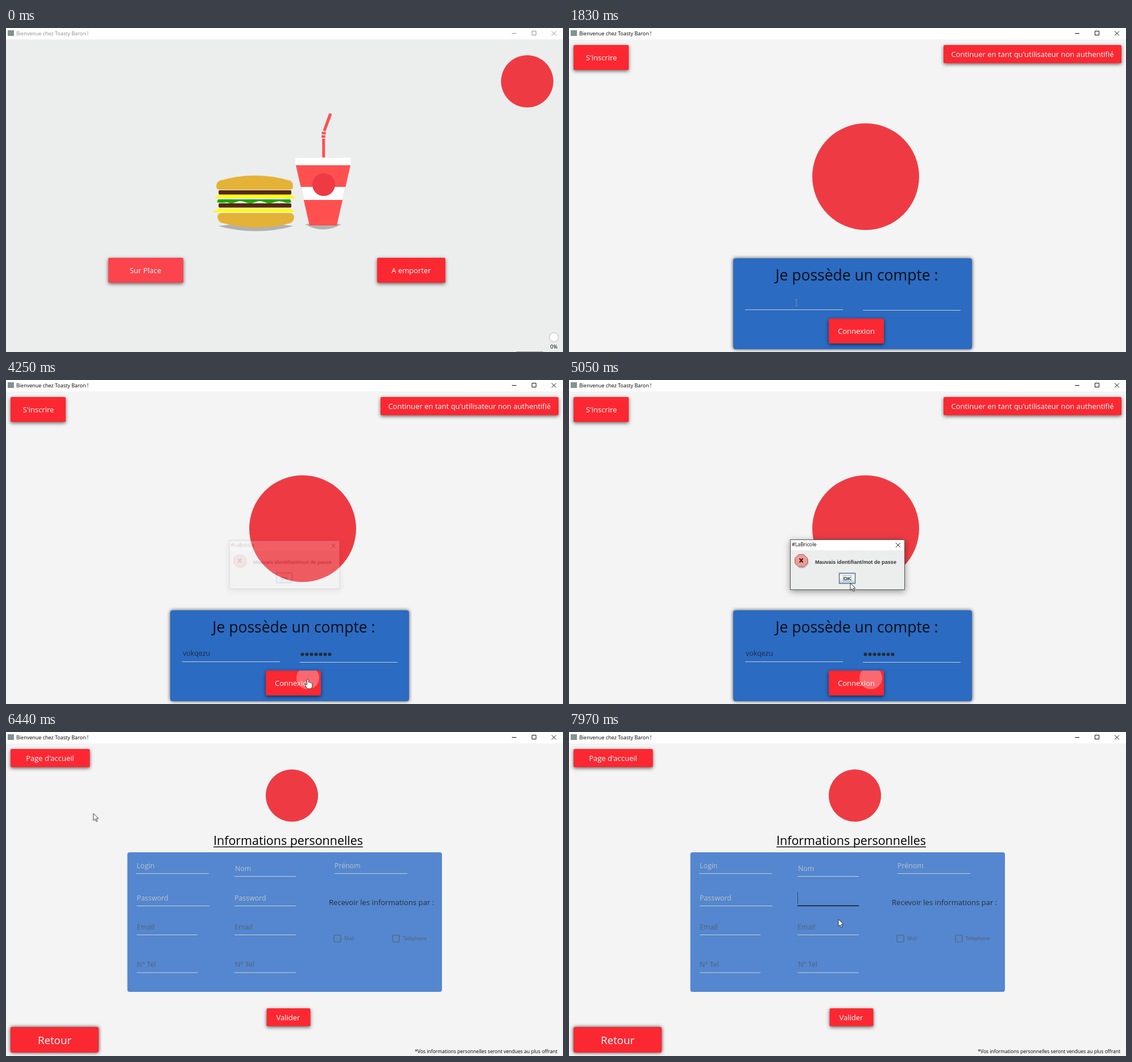
These frames come from a looping animation (980 by 571 pixels, 8 s). An HTML page:

```html
<!DOCTYPE html>
<html lang="fr">
<head>
<meta charset="utf-8">
<title>Borne de commande</title>
<style>
html, body { margin: 0; width: 100%; height: 100%; overflow: hidden; background: #f4f4f4; }
svg { display: block; width: 980px; height: 571px; font: 13px "Open Sans", "Noto Sans", sans-serif; }
text { white-space: pre; }
.mid text { text-anchor: middle; fill: #fff; }
.btn { fill: #fb2832; filter: drop-shadow(0 2px 3px rgba(0,0,0,.6)); }
.small { font-size: 8.8px; }
.logo { fill: #ee3b43; }
.line { stroke: #c9cdd3; }
.focus { fill: #14181f; transform-box: fill-box; transform-origin: center; }
.prompt { font-size: 12.4px; fill: #bcc2cb; }
.dim { fill: #55606f; }

/* one shared 8 s clock: percentage = ms / 80 */
.a { animation: 8s linear infinite; }
.s { animation: 8s step-end infinite; }

.scene1 { animation-name: scene1; }
.scene3 { animation-name: scene3; }
@keyframes scene1 { 0% { opacity: 1 } 16.25%, 100% { opacity: 0 } }
@keyframes scene3 { 0% { opacity: 0 } 76.875%, 100% { opacity: 1 } }

.bar { animation-name: bar; }
.hint { animation-name: hint; }
.warm { animation-name: warm; }
@keyframes bar { 0% { opacity: .45 } 2.875%, 100% { opacity: 1 } }
@keyframes hint { 0% { opacity: 1 } 2.875%, 100% { opacity: 0 } }
@keyframes warm { 0% { opacity: .13 } .25%, 100% { opacity: 0 } }

.rip1 { animation-name: rip1; }
.rip2 { animation-name: rip2; }
.rip3 { animation-name: rip3; }
@keyframes rip1 {
  0%, 13.5% { transform: scale(0); opacity: .3 }
  16.25%, 100% { transform: scale(1.69); opacity: .3 }
}
@keyframes rip2 {
  0%, 52.125% { transform: scale(0); opacity: .3 }
  53.125%, 65% { transform: scale(1); opacity: .3 }
  66.875%, 100% { transform: scale(1); opacity: 0 }
}
@keyframes rip3 {
  0%, 74.5% { transform: scale(0); opacity: .3 }
  76.875%, 100% { transform: scale(1.5); opacity: .3 }
}

.focus1 { animation-name: focus1; }
.focus2 { animation-name: focus2; }
.focus3 { animation-name: focus3; }
@keyframes focus1 {
  0%, 23.375% { transform: scaleX(0) }
  25.625%, 37.62% { transform: scaleX(1) }
  37.625%, 100% { transform: scaleX(0) }
}
@keyframes focus2 {
  0%, 37.625% { transform: scaleX(0) }
  40.625%, 52.12% { transform: scaleX(1) }
  52.125%, 100% { transform: scaleX(0) }
}
@keyframes focus3 {
  0%, 96.375% { transform: scaleX(0) }
  98.75%, 100% { transform: scaleX(1) }
}
.caret { animation-name: caret; }
.gone { animation-name: gone; }
@keyframes caret { 0% { opacity: 0 } 96.375%, 100% { opacity: 1 } }
@keyframes gone { 0% { opacity: 1 } 96.375%, 100% { opacity: 0 } }

/* typed characters appear at --t and outlast their scene */
.key > * { opacity: 0; animation: key 8s step-end calc(var(--t) * 1ms) infinite; }
@keyframes key { 0% { opacity: 1 } 60%, 100% { opacity: 0 } }

.dialog { animation-name: dialog; transform-origin: 490px 325px; }
@keyframes dialog {
  0%, 52.75% { opacity: 0; transform: scale(.955) }
  53.125% { opacity: .18; transform: scale(.965) }
  55%, 64.5% { opacity: 1; transform: none }
  66.25%, 100% { opacity: 0; transform: scale(.95) }
}

.cursor { animation-name: move; }
@keyframes move {
  0% { transform: translate(920px, 600px) }
  3.25% { transform: translate(920px, 571px); animation-timing-function: ease-in-out }
  12.5%, 16.625% { transform: translate(264px, 430px); animation-timing-function: ease-in-out }
  22.875%, 35% { transform: translate(400px, 484px); animation-timing-function: ease-in-out }
  37.25%, 46.25% { transform: translate(531px, 483px); animation-timing-function: ease-in }
  47.375% { transform: translate(531px, 515px); animation-timing-function: ease-out }
  49%, 55% { transform: translate(531px, 527px); animation-timing-function: ease-in-out }
  61.25%, 65% { transform: translate(495px, 358px); animation-timing-function: ease-in }
  71.625% { transform: translate(192px, 148px); animation-timing-function: ease-out }
  74.125%, 77.5% { transform: translate(75px, 52px); animation-timing-function: ease-in }
  80.5% { transform: translate(153px, 143px) }
  82.25% { transform: translate(253px, 199px); animation-timing-function: ease-out }
  92.25% { transform: translate(488px, 275px) }
  94.5% { transform: translate(455px, 240px); animation-timing-function: ease-in-out }
  96.25%, 97% { transform: translate(455px, 290px); animation-timing-function: ease-in-out }
  98.75%, 100% { transform: translate(474px, 330px) }
}
.arrow { animation-name: arrow; }
.beam { animation-name: beam; }
.hand { animation-name: hand; }
@keyframes arrow {
  0% { opacity: 0 } 3.25% { opacity: 1 } 21.5% { opacity: 0 }
  56.5% { opacity: 1 } 93.75% { opacity: 0 } 97.5%, 100% { opacity: 1 }
}
@keyframes beam {
  0% { opacity: 0 } 21.5% { opacity: 1 } 47.25% { opacity: 0 }
  93.75% { opacity: 1 } 97.5%, 100% { opacity: 0 }
}
@keyframes hand { 0% { opacity: 0 } 47.25% { opacity: 1 } 56.5%, 100% { opacity: 0 } }
</style>
</head>
<body>
<svg viewBox="0 0 980 571">
<defs>
  <clipPath id="c1"><rect x="180" y="405" width="132" height="44" rx="2"/></clipPath>
  <clipPath id="c2"><rect x="457" y="512" width="97" height="44" rx="2"/></clipPath>
  <clipPath id="c3"><rect x="8" y="30" width="97" height="44" rx="2"/></clipPath>
  <linearGradient id="metal" x2="0" y2="1">
    <stop stop-color="#dce7f2"/><stop offset=".4" stop-color="#fff"/><stop offset="1" stop-color="#b8cfe5"/>
  </linearGradient>
</defs>

<!-- login -->
<g>
  <rect y="20" width="980" height="551" fill="#f4f4f4"/>
  <circle class="logo" cx="522" cy="262" r="94"/>
  <g class="mid">
    <rect class="btn" x="8" y="30" width="97" height="44" rx="2"/>
    <text x="57" y="56.500">S'inscrire</text>
    <rect class="btn" x="659" y="30" width="313" height="32" rx="2"/>
    <text x="815.500" y="50.500">Continuer en tant qu'utilisateur non authentifié</text>
  </g>
  <g clip-path="url(#c3)"><g transform="translate(75 52)"><circle class="a rip3" r="37" fill="#fff"/></g></g>

  <rect x="289" y="406" width="420" height="160" rx="4" fill="#2b6bc2" style="filter:drop-shadow(0 0 3px rgba(0,0,0,.75))"/>
  <text x="506.500" y="445" text-anchor="middle" font-size="26.500" fill="#0b0e14">Je possède un compte :</text>
  <path class="line" d="M310 496.500H482M517 497.500H689"/>
  <rect class="a focus focus1" x="310" y="495.500" width="172" height="2"/>
  <rect class="a focus focus2" x="517" y="496" width="172" height="2"/>
  <text class="key" x="311" y="486" font-size="12.500" fill="#1f2c40"><tspan style="--t:2180">v</tspan><tspan style="--t:2270">o</tspan><tspan style="--t:2360">k</tspan><tspan style="--t:2450">q</tspan><tspan style="--t:2540">e</tspan><tspan style="--t:2630">z</tspan><tspan style="--t:2720">u</tspan></text>
  <g class="key" fill="#252b35">
    <circle cx="521.500" cy="483.500" r="3" style="--t:3270"/>
    <circle cx="529.500" cy="483.500" r="3" style="--t:3330"/>
    <circle cx="537.500" cy="483.500" r="3" style="--t:3390"/>
    <circle cx="545.500" cy="483.500" r="3" style="--t:3450"/>
    <circle cx="553.500" cy="483.500" r="3" style="--t:3510"/>
    <circle cx="561.500" cy="483.500" r="3" style="--t:3570"/>
    <circle cx="569.500" cy="483.500" r="3" style="--t:3630"/>
  </g>
  <g class="mid">
    <rect class="btn" x="457" y="512" width="97" height="44" rx="2"/>
    <text x="505.500" y="539">Connexion</text>
  </g>
  <g clip-path="url(#c2)"><g transform="translate(531 525)"><circle class="a rip2" r="20" fill="#fff"/></g></g>

  <g class="a dialog">
    <g style="filter:drop-shadow(0 3px 6px rgba(0,0,0,.4))">
      <rect x="389" y="281" width="202" height="89" fill="#eceeed"/>
    </g>
    <rect x="389" y="281" width="202" height="19" fill="#fff"/>
    <rect x="389.500" y="281.500" width="201" height="88" fill="none" stroke="#555"/>
    <text class="small" x="392" y="293">#LaBricole</text>
    <path d="M575 287l8 8m0-8l-8 8" stroke="#222"/>
    <path d="M404 308h9l7 7v8l-7 7h-9l-6-7v-8z" fill="#8f8f8f" opacity=".5" transform="translate(1.500 1.500)"/>
    <path d="M404 307.500h9l6.500 6.500v9l-6.500 6h-9l-6.500-6v-9z" fill="#eb9d98" stroke="#b9524f"/>
    <path d="M405.500 314.500l6 7m0-7l-6 7" stroke="#4d1414" stroke-width="2"/>
    <g font-family="'Liberation Sans', Arial, sans-serif" font-weight="700" font-size="9.130" fill="#333">
      <text x="433" y="324">Mauvais identifiant/mot de passe</text>
      <rect x="475.500" y="340.500" width="28" height="18" fill="url(#metal)" stroke="#65727f" stroke-width="1.500"/>
      <rect x="482.500" y="344.500" width="14" height="10" fill="none" stroke="#9db8d3"/>
      <text x="489.500" y="353" text-anchor="middle">OK</text>
    </g>
  </g>
</g>

<!-- welcome -->
<g class="s scene1">
  <rect y="20" width="980" height="551" fill="#eceeed"/>
  <circle class="logo" cx="917" cy="94" r="46"/>
  <path d="M373 349Q440 340 506 349Q440 367 373 349M526 346Q558 341 590 346Q558 364 526 346" fill="#b1b1b1"/>
  <g fill="#e4b236">
    <path d="M370 279Q370 272 376 269Q438 251 500 269Q505 272 505 279Q505 285 498 285H377Q370 285 370 279"/>
    <path d="M372 333Q373 326 379 326H500Q507 327 507 334Q506 341 500 344Q440 360 378 343Q373 340 372 333"/>
  </g>
  <g fill="#552a08">
    <rect x="374" y="286" width="128" height="7.500" rx="2"/>
    <rect x="374" y="309" width="128" height="7.500" rx="2"/>
  </g>
  <path d="M366 300L375 294H502L510 300zM363 324.500L374 318.500H500L509 324.500z" fill="#fffb15"/>
  <path d="M373 302H500L502 307Q494 310 487 306Q479 304 472 307Q463 311 455 307Q447 303 438 307Q429 311 421 307Q412 303 404 307Q396 311 389 307Q380 309 371 307z" fill="#1fa50e"/>
  <g fill="#ff5050">
    <path d="M510 242H606L582 348H534z"/>
    <path d="M556.300 195h5v33h-5zM555.300 189h6.500v4.500h-6.500zM555.500 182.500l7 1v4.500l-7-1zM557.500 180.500L568.500 150l5 1.700L562.300 182.300z"/>
  </g>
  <path d="M509 229H606.500V240H509zM518.600 280H597.400L592.200 303H523.800z" fill="#fff"/>
  <circle class="logo" cx="559" cy="276" r="20"/>

  <g class="mid">
    <rect class="btn" x="180" y="405" width="132" height="44" rx="2"/>
    <rect class="s warm" x="180" y="405" width="132" height="44" rx="2" fill="#fff"/>
    <text x="245.500" y="432">Sur Place</text>
    <rect class="btn" x="653" y="405" width="120" height="44" rx="2"/>
    <text x="713" y="432">A emporter</text>
  </g>
  <g clip-path="url(#c1)"><g transform="translate(264 430)"><circle class="a rip1" r="37" fill="#fff"/></g></g>

  <circle cx="964" cy="545" r="8" fill="#fff" stroke="#cfcfcf" stroke-width="1.500"/>
  <text class="small" x="964" y="565" text-anchor="middle">0%</text>
  <rect class="s hint" x="898" y="570" width="47" height="1" fill="#999"/>
</g>

<!-- sign-up form -->
<g class="s scene3">
  <rect y="20" width="980" height="551" fill="#f4f4f4"/>
  <circle class="logo" cx="503" cy="112" r="46"/>
  <text x="496.500" y="199" text-anchor="middle" font-size="21.400">Informations personnelles</text>
  <path d="M365 202.500H628" stroke="#111" stroke-width="1.500"/>
  <rect x="213.500" y="212" width="553.500" height="246" rx="4" fill="#5487cf"/>
  <path class="line" d="M229 249.500H357M402 254.500H510M578 249.500H706M230 306.500H358M402 306.500H510M230 357.500H337M402 357.500H510M230 424H337M402 424H510"/>
  <g class="prompt">
    <text x="230" y="240">Login</text>
    <text x="403" y="245">Nom</text>
    <text x="578" y="240">Prénom</text>
    <text x="230" y="297">Password</text>
    <text class="s gone" x="402" y="297">Password</text>
    <g class="dim">
      <text x="230" y="348">Email</text>
      <text x="402" y="348">Email</text>
      <text x="230" y="414">N° Tel</text>
      <text x="403" y="414">N° Tel</text>
    </g>
  </g>
  <rect class="a focus focus3" x="402" y="305.500" width="108" height="1.500"/>
  <rect class="s caret" x="402" y="282" width="1" height="20" fill="#3a4452"/>
  <text x="568" y="305" font-size="13.100" fill="#26303d">Recevoir les informations par :</text>
  <g class="small dim">
    <g fill="none" stroke="#55606f" stroke-width="1.200">
      <rect x="577" y="358" width="12" height="12" rx="1.500"/>
      <rect x="680" y="358" width="12" height="12" rx="1.500"/>
    </g>
    <text x="595" y="367">Mail</text>
    <text x="698" y="367">Téléphone</text>
  </g>
  <g class="mid">
    <rect class="btn" x="8" y="30" width="139.500" height="32" rx="2"/>
    <text x="77.500" y="50.500">Page d'accueil</text>
    <rect class="btn" x="458.500" y="487" width="77" height="31.500" rx="2"/>
    <text x="496.500" y="507.500">Valider</text>
    <rect x="8" y="520" width="155" height="45" rx="3" fill="#fb2832" style="filter:drop-shadow(0 0 3px rgba(0,0,0,.8))"/>
    <text x="85.500" y="549.500" font-size="18.700">Retour</text>
  </g>
  <text x="970" y="566" text-anchor="end" font-size="8.570">*Vos informations personnelles seront vendues au plus offrant</text>
</g>

<!-- title bar -->
<rect width="980" height="20" fill="#fff"/>
<rect x="3" y="4" width="11" height="10" fill="#7f9294"/>
<g class="s bar">
  <text x="18" y="12.500" font-size="9">Bienvenue chez Toasty Baron !</text>
  <path d="M890 9.500h8M925.500 5.500h7v7h-7zM960 5.500l8 8m0-8l-8 8" fill="none" stroke="#111"/>
</g>

<g class="a cursor">
  <path class="s arrow" d="M0 0V12.500L3 9.800L5 14.500L7 13.600L5 9H9z" fill="#fff" stroke="#222" stroke-width=".9"/>
  <path class="s beam" d="M-2 -5.500H2M0 -5.500V5.500M-2 5.500H2" fill="none" stroke="#8c8c8c"/>
  <path class="s hand" d="M-1.500 1Q0 -1 1.500 1V6Q3 5 4 6.500Q6 6 6.500 7.500Q8 7 8 9V12L6.500 17H-1L-4.500 11Q-5 9 -3 9L-1.500 10.500z" fill="#fff" stroke="#222" stroke-width=".9"/>
</g>
</svg>
</body>
</html>
```
